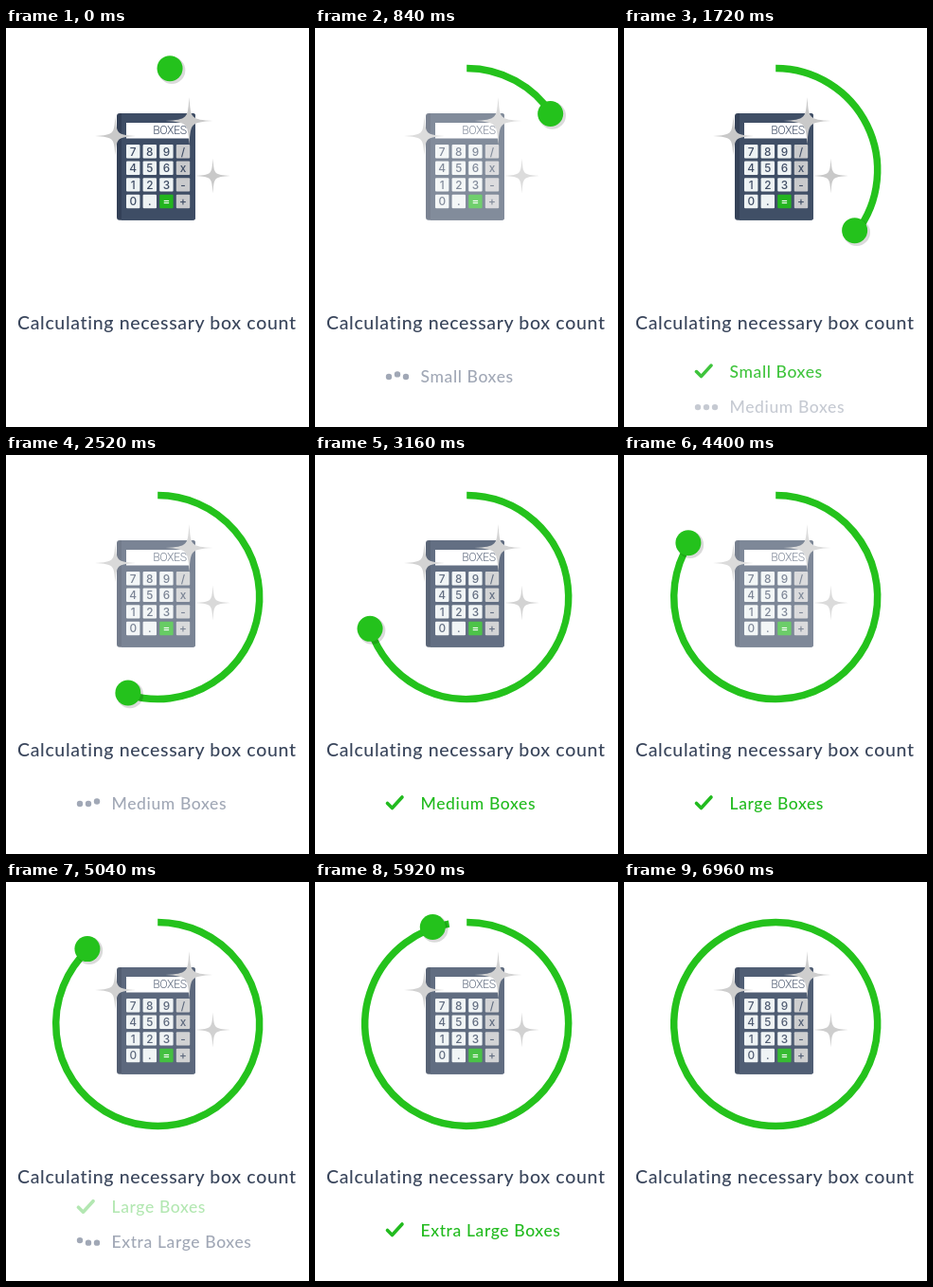
Write an HTML page that moves like this. It is 320x421 px and loops after 7000 ms.

```html
<!DOCTYPE html>
<html lang="en">
<head>
<meta charset="utf-8">
<title>Box count loader</title>
<style>
  html, body { margin: 0; width: 100%; height: 100%; overflow: hidden; background: #fff; }
  svg { display: block; width: 100%; height: 100%; }
  .title { font: 500 19.5px Lato, "Open Sans", sans-serif; letter-spacing: .66px; fill: #3a465c; }
  .item text { font: 500 17.5px Lato, "Open Sans", sans-serif; letter-spacing: .62px; }
  .key { font: 500 11.8px Inter, Roboto, sans-serif; text-anchor: middle; }
  .screen { font: 300 12.4px Roboto, Inter, sans-serif; letter-spacing: -.5px; text-anchor: end; fill: #3f4d65; }
</style>
</head>
<body>
<svg viewBox="0 0 320 421">
  <defs>
    <filter id="soft" x="-30%" y="-30%" width="160%" height="160%">
      <feGaussianBlur stdDeviation=".7"/>
    </filter>
  </defs>
  <g id="calc">
    <rect x="117" y="90" width="83" height="112.700" rx="3" fill="#334057"/>
    <path d="M122 90H197.500a2.500 2.500 0 0 1 2.500 2.500V200.200a2.500 2.500 0 0 1-2.500 2.500H122z" fill="#3e4d65"/>
    <rect x="127" y="100" width="66.500" height="16.500" fill="#fff"/>
    <text class="screen" x="190.500" y="112.300">BOXES</text>
    <g id="keys"></g>
    <g id="sparkles" fill="#c9c9c9"></g>
  </g>
  <path id="arc" fill="none" stroke="#24c21c" stroke-width="7.500"/>
  <g id="ball">
    <circle cx="2" cy="2" r="14.300" fill="#000" opacity=".14" filter="url(#soft)"/>
    <circle r="13.500" fill="#24c21c"/>
  </g>
  <text class="title" x="12" y="318">Calculating necessary box count</text>
  <g id="list"></g>
</svg>
<script>
const LOOP = 7000;
const RING = { x: 160.2, y: 150, r: 107.5 };
const ORBIT = { x: 159, y: 148.5, r: 106.8 };
const FIRST = 33, STEP = 1567, SLIDE = 510, ROW = 37, CHECK_AT = 1000;
const PULSE = 1820, PULSE_DEPTH = 0.36;
const GRAY = '#a1a8b6', GREEN = '#22bb1f';

// Ball position: [ms, degrees clockwise from the top]
const SWEEP = [
  [0, 7.5], [720, 48], [1480, 105], [1720, 127.5], [2520, 196.3], [2880, 228],
  [3480, 277], [3640, 283], [4340, 300], [5040, 316.8], [5920, 341], [6560, 360]
];

const $ = id => document.getElementById(id);
const clamp = v => Math.min(1, Math.max(0, v));
const ease = v => (1 - Math.cos(Math.PI * clamp(v))) / 2;

function add(parent, tag, attrs, text) {
  const el = document.createElementNS('http://www.w3.org/2000/svg', tag);
  for (const name in attrs) el.setAttribute(name, attrs[name]);
  if (text) el.textContent = text;
  return parent.appendChild(el);
}

[...'789/456x123-0.=+'].forEach((label, i) => {
  const x = 127 + (i % 4) * 17.6, y = 123 + Math.floor(i / 4) * 17.6;
  const equals = label === '=';
  const fill = equals ? '#22b51e' : i % 4 === 3 ? '#c9cacc' : '#eef3f4';
  add($('keys'), 'rect', { x, y, width: 14.4, height: 14.4, rx: 1, fill });
  add($('keys'), 'text', {
    class: 'key', x: x + 7.2, y: y + 11.5, fill: equals ? '#fff' : '#3f4d65'
  }, label);
});

[[193.5, 98, 25], [115.5, 114, 21.5], [218.5, 156, 18.5]].forEach(([x, y, r]) => {
  const k = r * 0.07;
  const arm = (sx, sy, end) => `C${sx * k} ${sy * k} ${sx * k} ${sy * k} ${end}`;
  add($('sparkles'), 'path', {
    transform: `translate(${x} ${y})`,
    d: `M0 ${-r}` + arm(1, -1, `${r} 0`) + arm(1, 1, `0 ${r}`) +
      arm(-1, 1, `${-r} 0`) + arm(-1, -1, `0 ${-r}`) + 'z'
  });
});

const items = ['Small', 'Medium', 'Large', 'Extra Large'].map((size, i) => {
  const group = add($('list'), 'g', { class: 'item' });
  const label = add(group, 'text', { x: 111.5, y: 6.6 }, size + ' Boxes');
  const dots = [78, 87, 96].map(cx => add(group, 'circle', { cx, r: 3.2, fill: GRAY }));
  const tick = add(group, 'path', {
    d: 'M76.5 .5L81.500 5.500L92 -6', fill: 'none', stroke: GREEN,
    'stroke-width': 3.6, 'stroke-linecap': 'round', 'stroke-linejoin': 'round'
  });
  return { group, label, dots, tick, start: FIRST + i * STEP };
});

function sweepAt(t) {
  const i = SWEEP.findIndex(p => p[0] > t);
  if (i < 0) return 360;
  const [t0, a0] = SWEEP[i - 1], [t1, a1] = SWEEP[i];
  return a0 + (a1 - a0) * (t - t0) / (t1 - t0);
}

function pointOn({ x, y, r }, deg) {
  const a = deg * Math.PI / 180;
  return [x + r * Math.sin(a), y - r * Math.cos(a)];
}

function drawRing(t) {
  const angle = sweepAt(t);
  const end = Math.min(360, angle + 9 * clamp((t - 5040) / 880));
  const [x, y] = pointOn(RING, Math.min(end, 359.99));
  const close = end >= 360 ? 'z' : '';
  $('arc').setAttribute('d',
    `M${RING.x} ${RING.y - RING.r}A${RING.r} ${RING.r} 0 ${end > 180 ? 1 : 0} 1 ${x} ${y}${close}`);
  const [bx, by] = pointOn(ORBIT, angle);
  const scale = 1 - ease((t - 6640) / 260);
  $('ball').setAttribute('transform', `translate(${bx} ${by}) scale(${scale})`);
}

function drawItem({ group, label, dots, tick, start }, t) {
  const age = t - start;
  const enter = ease(age / SLIDE), leave = ease((age - STEP) / SLIDE);
  const y = 367 + ROW * (1 - enter - leave);
  group.setAttribute('transform', `translate(0 ${y})`);
  group.setAttribute('opacity', clamp(age / 200) * (1 - leave));

  const done = age >= CHECK_AT;
  label.setAttribute('fill', done ? GREEN : GRAY);
  tick.setAttribute('opacity', done ? 1 : 0);
  dots.forEach((dot, i) => {
    const phase = age - 200 - i * 130;
    const hop = phase > 0 ? Math.sin(Math.PI * clamp(phase % 370 / 200)) : 0;
    dot.setAttribute('cy', 1 - 2.6 * hop);
    dot.setAttribute('opacity', done ? 0 : 1);
  });
}

function draw(t) {
  const dim = (1 - Math.cos(2 * Math.PI * t / PULSE)) / 2;
  $('calc').setAttribute('opacity', 1 - PULSE_DEPTH * dim);
  drawRing(t);
  items.forEach(item => drawItem(item, t));
}

const begin = performance.now();
function tick() {
  draw((performance.now() - begin) % LOOP);
  requestAnimationFrame(tick);
}
tick();
</script>
</body>
</html>
```
